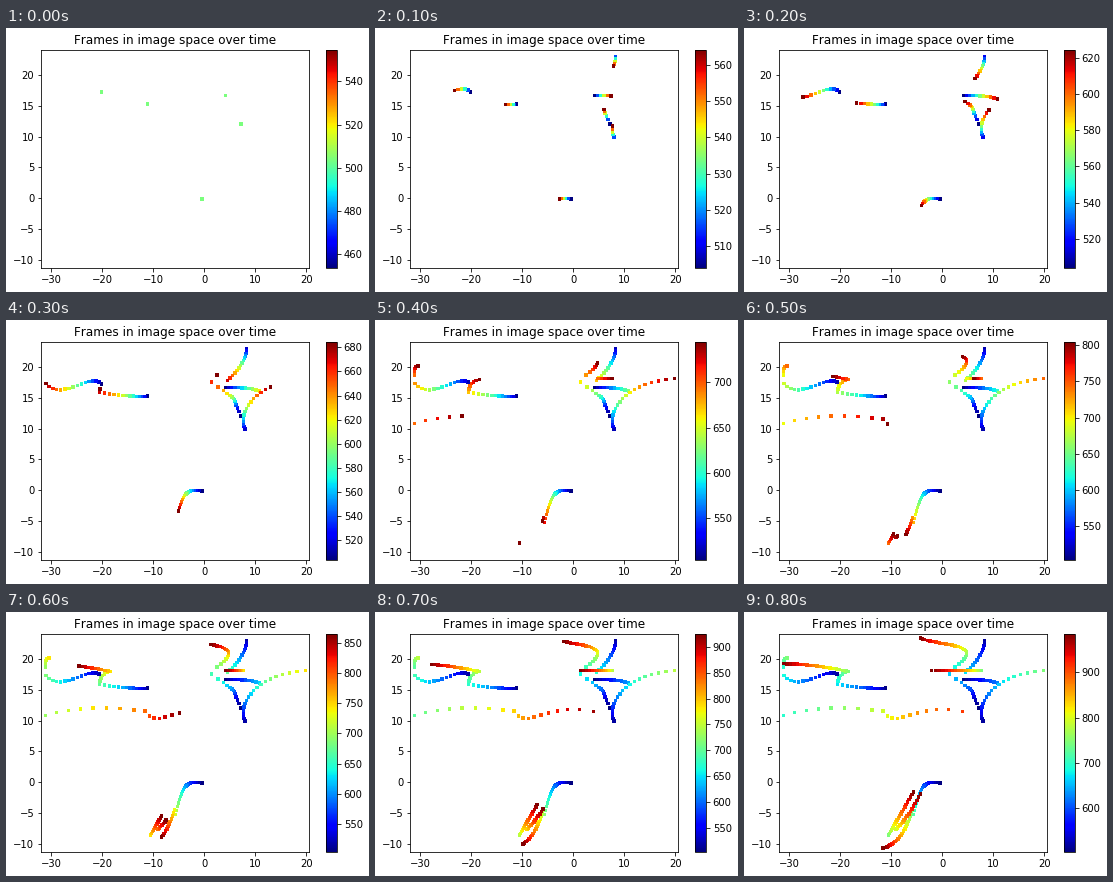
These frames come from a looping animation (363 px wide and 264 px high, 900 ms). A matplotlib script:

```python
import numpy as np
import matplotlib.pyplot as plt
from matplotlib.animation import FuncAnimation
from matplotlib.ticker import MaxNLocator

W, H, DPI = 363, 264, 72
FRAMES, INTERVAL = 9, 100
START, STEP, PER_FRAME = 504, 12, 5   # time of first sample, spacing, samples per frame

plt.rcParams.update({"font.family": "DejaVu Sans", "font.size": 10,
                     "text.kerning_factor": 6})


def curve(first, last, *points):
    """One Bezier sample per time step: rows of sample number, x, y."""
    n = np.arange(first, last + 1)
    t = ((n - first) / (last - first))[:, None]
    p = [np.array(q) for q in points]
    while len(p) > 1:
        p = [a + (b - a) * t for a, b in zip(p, p[1:])]
    return np.column_stack([n, p[0]])


paths = [
    # upper left
    curve(0, 15, (-20.2, 17.3), (-22.5, 19.3), (-27.9, 14.3), (-31.1, 17.4)),
    curve(16, 20, (-31.2, 18.8), (-31.3, 20.2), (-30.5, 20.2)),
    curve(0, 14, (-11.2, 15.3), (-13.2, 15.1), (-20.6, 15.9)),
    curve(15, 20, (-20.5, 16.5), (-20.2, 17.8), (-18.4, 18)),
    curve(21, 40, (-18.9, 18.1), (-24.9, 19.2), (-31.1, 19.3)),
    # upper right
    curve(0, 10, (4.1, 16.7), (7.3, 16.9), (10.8, 16.2)),
    curve(0, 13, (7.2, 12.1), (4.9, 15.7), (7.7, 13.9), (1.4, 17.6)),
    curve(15, 40, (2.5, 18.8), (9.4, 22.8), (-1.4, 22.2), (-4.3, 23.5)),
    curve(1, 14, (8.3, 23.1), (8.1, 20.5), (4.5, 17.9)),
    curve(16, 20, (4.8, 18.2), (7.6, 18.2)),
    curve(21, 40, (7.3, 18.2), (5.2, 18.2), (-2.1, 18.2)),
    curve(1, 20, (8, 10), (6.6, 12.3), (9.1, 17.4), (19.8, 18.2)),
    # crossing the middle
    curve(16, 23, (-31.2, 10.9), (-23.6, 12.7), (-13.8, 11.8)),
    curve(24, 34, (-11.6, 11.6), (-8.8, 8.2), (-5.7, 13.2), (3.9, 11.5)),
    # bottom
    curve(0, 18, (-0.5, -0.1), (-4, 0.3), (-4.3, -0.9), (-5.7, -5.3)),
    curve(19, 40, (-5.9, -4.5), (-7.8, -10), (-11.6, -10.7)),
    curve(20, 40, (-10.6, -8.6), (-8.6, -5.9), (-5.7, -1.6)),
    curve(24, 40, (-9.1, -7.6), (-7.1, -6.3), (-4.3, -1.9)),
]
samples = np.vstack(paths)
samples = samples[np.argsort(samples[:, 0], kind="stable")]

fig = plt.figure(figsize=(W / DPI, H / DPI), dpi=DPI, facecolor="white")


def add_axes(x, y, w, h):
    return fig.add_axes([x / W, y / H, w / W, h / H])


ax = add_axes(35.3, 24.2, 267.84, 217.44)
cax = add_axes(319.88, 24.2, 10.87, 217.44)

ax.set_title("Frames in image space over time", fontsize=12)
ax.set(xlim=(-31.98, 20.54), ylim=(-11.34, 24.08),
       xticks=range(-30, 21, 10), yticks=range(-10, 21, 5))

dots = ax.scatter([0], [0], c=[START], s=12.5, marker="s", linewidths=0,
                  cmap="jet", vmin=START * 0.9, vmax=START * 1.1)
bar = fig.colorbar(dots, cax=cax, ticks=MaxNLocator(9, steps=[1, 2, 5, 10]))


def draw(k):
    last = PER_FRAME * k
    seen = samples[samples[:, 0] <= last]
    dots.set_offsets(seen[:, 1:])
    dots.set_array(START + STEP * seen[:, 0])
    if k:
        dots.set_clim(START, START + STEP * last)
    else:
        dots.set_clim(START * 0.9, START * 1.1)
    return dots,


anim = FuncAnimation(fig, draw, frames=FRAMES, init_func=lambda: draw(0),
                     interval=INTERVAL, repeat=True, repeat_delay=0, blit=False)
plt.show()
```
